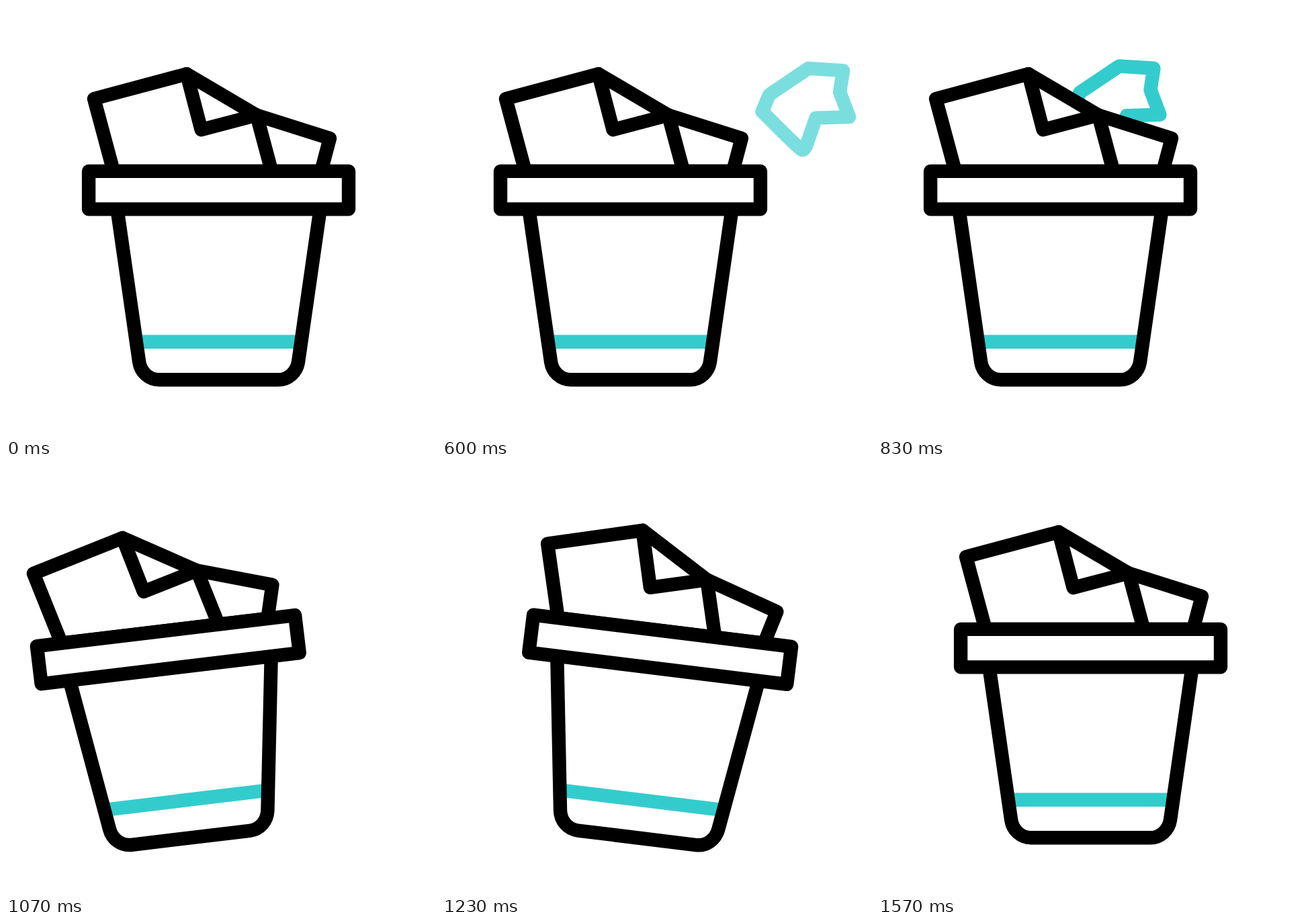
Recreate the animation shown at these times as an HTML page. Size 640 by 640 pixels, loop 2.5 s.

```html
<!DOCTYPE html>
<html lang="en">
<head>
<meta charset="utf-8">
<title>Paper bin</title>
<style>
  html, body { margin: 0; width: 100%; height: 100%; overflow: hidden; background: #fff; }
  svg { display: block; width: 100%; height: 100%; }
</style>
</head>
<body>
<svg viewBox="0 0 640 640" fill="none" stroke="#000" stroke-width="20.4" stroke-linecap="round" stroke-linejoin="round">
  <path id="route" stroke="none" d="M6.5 35Q5 14 0 0C-28 -79 -165 -82 -186.5 -3.3C-196 32 -200.5 80 -200.5 155"/>
  <path id="ball" stroke="#33cccc" d="M545.5 92.7L597 96L592 128L606 165L556.5 166.5L542 208Q538.5 216.5 534 213Q520 201 476.5 157L487 132Z"/>
  <g id="bin">
    <g fill="#fff">
      <path d="M373 162.5L482 197L469 246H373Z"/>
      <path d="M160 246L131 138L269 101.2L373 162.5L395.4 246Z"/>
    </g>
    <path d="M269 101.2L290.6 184.2L373 162.5"/>
    <path fill="#fff" stroke="none" d="M165.4 302L198.2 530C200.5 545 212.7 556.3 228 556.3H405C420.3 556.3 432.5 545 435 530L467.7 302Z"/>
    <path stroke="#33cccc" stroke-linecap="butt" d="M194 499.8H439"/>
    <path d="M165.4 302L198.2 530C200.5 545 212.7 556.3 228 556.3H405C420.3 556.3 432.5 545 435 530L467.7 302"/>
    <path fill="#fff" d="M123.1 245.9H510V302.4H123.1Z"/>
  </g>
</svg>
<script>
  const LOOP = 2500;
  const [route, ball, bin] = ["route", "ball", "bin"].map(id => document.getElementById(id));
  const length = route.getTotalLength();

  // Keys are [tick, value] pairs at 30 ticks per second.
  const slide = [[13, 0], [20, -45], [29, -45], [47, 0]];
  const tilt = [[29, 0], [33, -8.1], [37, 7], [41, -5], [45, 0]];
  const fade = [[15, 0], [20, 1]];
  const flight = [[15, 0], [32, 1]];

  const ease = t => t * t * (3 - 2 * t);

  function valueAt(keys, tick) {
    if (tick <= keys[0][0]) return keys[0][1];
    for (let i = 1; i < keys.length; i++) {
      const [a, from] = keys[i - 1], [b, to] = keys[i];
      if (tick <= b) return from + (to - from) * ease((tick - a) / (b - a));
    }
    return keys[keys.length - 1][1];
  }

  // Ticks start on whole hundredths of a second.
  function tickAt(ms) {
    let tick = Math.floor(ms * 0.03) + 1;
    while (Math.round(tick * 10 / 3) * 10 > ms) tick--;
    return tick;
  }

  function draw(ms) {
    const tick = tickAt(ms);
    bin.setAttribute("transform",
      `translate(${valueAt(slide, tick)} 0) rotate(${valueAt(tilt, tick)} 316.5 556)`);

    const p = route.getPointAtLength(length * valueAt(flight, tick));
    ball.setAttribute("transform", `translate(${p.x} ${p.y})`);
    ball.setAttribute("opacity", tick < 32 ? valueAt(fade, tick) : 0);
  }

  const start = performance.now();
  function loop() {
    draw((performance.now() - start) % LOOP);
    requestAnimationFrame(loop);
  }
  loop();
</script>
</body>
</html>
```
